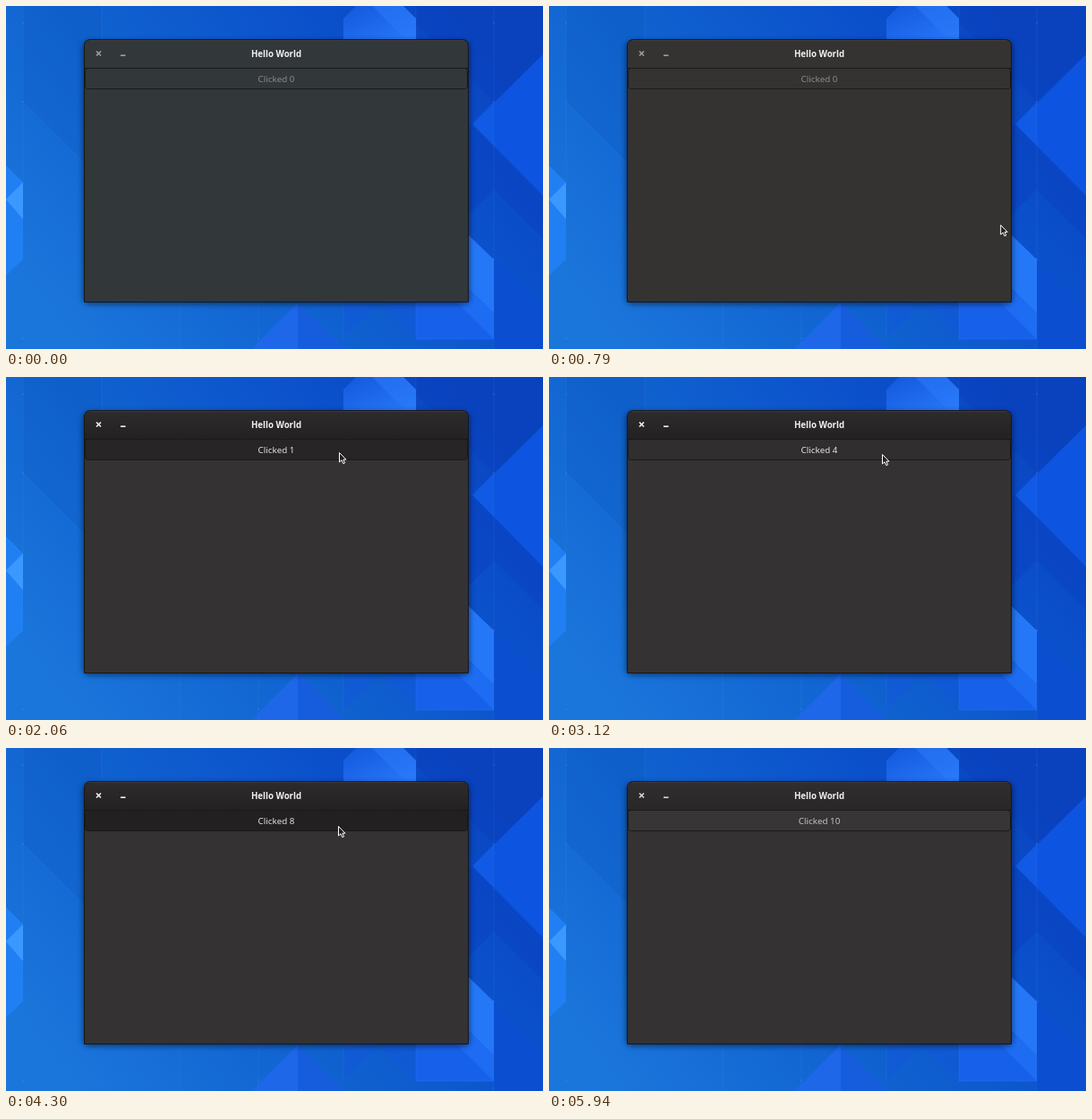
These frames come from a looping animation (600x383 px, 5970 ms). An HTML page:

```html
<!DOCTYPE html>
<html lang="en">
<head>
<meta charset="utf-8">
<title>Hello World</title>
<style>
  html, body { margin: 0; width: 100%; height: 100%; overflow: hidden; background: #0f5ccf; }
  svg { display: block; width: 600px; height: 383px; }
  text { font-family: "Noto Sans", "Open Sans", sans-serif; text-anchor: middle; }
</style>
</head>
<body>
<svg viewBox="0 0 600 383">
  <defs>
    <linearGradient id="sky" x1="0" y1=".75" x2="1" y2=".25">
      <stop offset="0" stop-color="#1b76db"/>
      <stop offset=".4" stop-color="#1062d0"/>
      <stop offset=".75" stop-color="#0b50cb"/>
      <stop offset="1" stop-color="#0a43c0"/>
    </linearGradient>
    <linearGradient id="glow" x1="0" y1="0" x2="1" y2="1">
      <stop offset="0" stop-color="#1358dc"/>
      <stop offset="1" stop-color="#2878fa"/>
    </linearGradient>
    <linearGradient id="header" x1="0" y1="0" x2="0" y2="1">
      <stop offset="0" stop-color="#2d2b2c"/>
      <stop offset="1" stop-color="#232122"/>
    </linearGradient>
    <filter id="blur" x="-10%" y="-10%" width="120%" height="120%">
      <feGaussianBlur stdDeviation="3"/>
    </filter>
  </defs>

  <g id="wallpaper">
    <path fill="url(#sky)" d="M0 0H600V383H0Z"/>
    <path fill="#0d52b8" opacity=".22" d="M19 0H107V19L19 107ZM19 107L107 195V19Z"/>
    <path fill="#0a42bd" opacity=".6" d="M458 0H600V54L545 107L458 19Z"/>
    <path fill="#0d54e0" d="M521 132L600 54V212Z"/>
    <path fill="#1460ec" opacity=".5" d="M521 132L545 107V156Z"/>
    <path fill="#0a45c4" opacity=".7" d="M521 132L600 212V260L545 205L517 233V136Z"/>
    <path fill="#0b4ed0" d="M545 283L600 338V383H545Z"/>
    <path fill="url(#glow)" d="M377 37V14L391 0H444L458 14V37Z"/>
    <path fill="#2b7afa" opacity=".55" d="M409 0H444L458 14V37H446Z"/>
    <path fill="#1761ea" d="M458 331H545V372H458Z"/>
    <path fill="#2478f8" d="M517 256L545 283V343L517 316Z"/>
    <path fill="#1d6cf2" d="M517 316L545 343V372L504 331Z"/>
    <path fill="#1258dc" d="M377 331H458V372L417 331L377 372Z" opacity=".5"/>
    <path fill="#1d67e8" d="M326 331L378 383H274Z"/>
    <path fill="#1257d8" opacity=".6" d="M326 331L378 383H326Z"/>
    <path fill="#2080f3" d="M0 178L19 197V283L0 301Z"/>
    <path fill="#3b98ff" d="M0 216L19 197V238Z"/>
    <path fill="none" stroke="#5aa0f0" opacity=".13"
      d="M19 0V197M19 107L107 195M107 0V37M194 331V383M282 331V383M377 331V372M545 0V383M458 0V37M458 331V372H545"/>
    <path fill="none" stroke="#8fc0ff" stroke-linecap="round" opacity=".5"
      d="M19 19h.1M19 107h.1M545 107h.1M545 283h.1M282 371h.1M19 371h.1M545 19h.1"/>
  </g>

  <rect x="86" y="39" width="432" height="294" rx="7" opacity=".5" filter="url(#blur)"/>
  <g id="window">
    <path id="body" d="M87.5 330.5V44.5Q87.5 37.5 94.5 37.5H509.5Q516.5 37.5 516.5 44.5V330.5Z" stroke="#171717"/>
    <path id="bar" fill="url(#header)" d="M88 69V45Q88 38 95 38H509Q516 38 516 45V69Z"/>
    <path d="M93 38.5H511" stroke="#454344" opacity=".7"/>
    <path d="M88 69.5H516" stroke="#151414"/>
    <g id="controls" fill="none" stroke-width="1.6">
      <path d="M101 50.5L106 55.5M106 50.5L101 55.5"/>
      <path d="M128 55.2H133.5"/>
    </g>
    <text x="302" y="56.6" font-size="9.7" font-weight="700" fill="#f0f0ef">Hello World</text>
    <rect id="button" x="88.5" y="69.5" width="427" height="23" rx="3" stroke="#1b1a1a"/>
    <text id="label" x="302" y="84.8" font-size="9.8"></text>
  </g>

  <path id="cursor" fill="#222" stroke="#fff" stroke-width="1" stroke-linejoin="round"
    d="M.5 .5V11L3 8.8L4.8 12.7L6.6 11.9L4.9 8.2H8Z"/>
</svg>

<script>
  const LOOP = 5970, STEP = 30, HOLD = 140;
  const FOCUS_ON = 1840, FOCUS_OFF = 5870, FADE = 200;
  const CLICKS = [1980, 2300, 2620, 2940, 3270, 3560, 3800, 4070, 4330, 4590];
  // Pointer stops: time, x, y
  const PATH = [
    [420, 602, 325], [790, 504, 244], [1250, 420, 130], [1640, 372, 84], [2060, 372, 84],
    [3120, 372, 86], [3700, 371, 87], [4620, 371, 87], [4940, 288, 140],
    [5130, 288, 140], [5600, 520, -16]
  ];

  const el = id => document.getElementById(id);
  const [body, bar, controls, button, label, cursor] =
    ["body", "bar", "controls", "button", "label", "cursor"].map(el);

  const clamp = v => Math.max(0, Math.min(1, v));
  const ease = v => v * v * (3 - 2 * v);
  const lerp = (a, b, k) => a + (b - a) * k;
  const mix = (a, b, k) => `rgb(${a.map((v, i) => Math.round(lerp(v, b[i], k)))})`;

  function pointer(t) {
    const i = PATH.findIndex(p => p[0] > t);
    if (i < 1) return null;
    const [t0, x0, y0] = PATH[i - 1], [t1, x1, y1] = PATH[i];
    const k = ease((t - t0) / (t1 - t0));
    return [lerp(x0, x1, k), lerp(y0, y1, k)];
  }

  function pressure(t) {
    return Math.max(...CLICKS.map(c =>
      t < c ? clamp((t - c + HOLD) / 30) : clamp(1 - (t - c) / FADE)));
  }

  function render(t) {
    const focus = clamp((t - FOCUS_ON) / FADE) * (1 - clamp((t - FOCUS_OFF) / FADE));
    const at = pointer(t);
    const hover = at && at[1] > 69 && at[1] < 93 && at[0] > 88 && at[0] < 516;
    const base = hover ? [50, 48, 49] : [55, 53, 54];

    body.setAttribute("fill", t < STEP ? "#32373a" : mix([53, 51, 50], [53, 50, 51], focus));
    bar.setAttribute("opacity", focus);
    controls.setAttribute("stroke", mix([160, 159, 157], [245, 245, 244], focus));
    button.setAttribute("fill", t < STEP ? "#32373a" :
      mix(focus ? base : [53, 51, 50], [34, 32, 33], pressure(t)));
    label.setAttribute("fill", mix([139, 138, 136], [226, 226, 225], focus));
    label.textContent = "Clicked " + CLICKS.filter(c => c <= t).length;

    cursor.setAttribute("visibility", at ? "visible" : "hidden");
    if (at) cursor.setAttribute("transform", `translate(${at[0]} ${at[1]})`);
  }

  const start = performance.now();
  function tick() {
    const t = (performance.now() - start) % LOOP;
    render(Math.floor(t / STEP) * STEP);
    requestAnimationFrame(tick);
  }
  tick();
</script>
</body>
</html>
```
